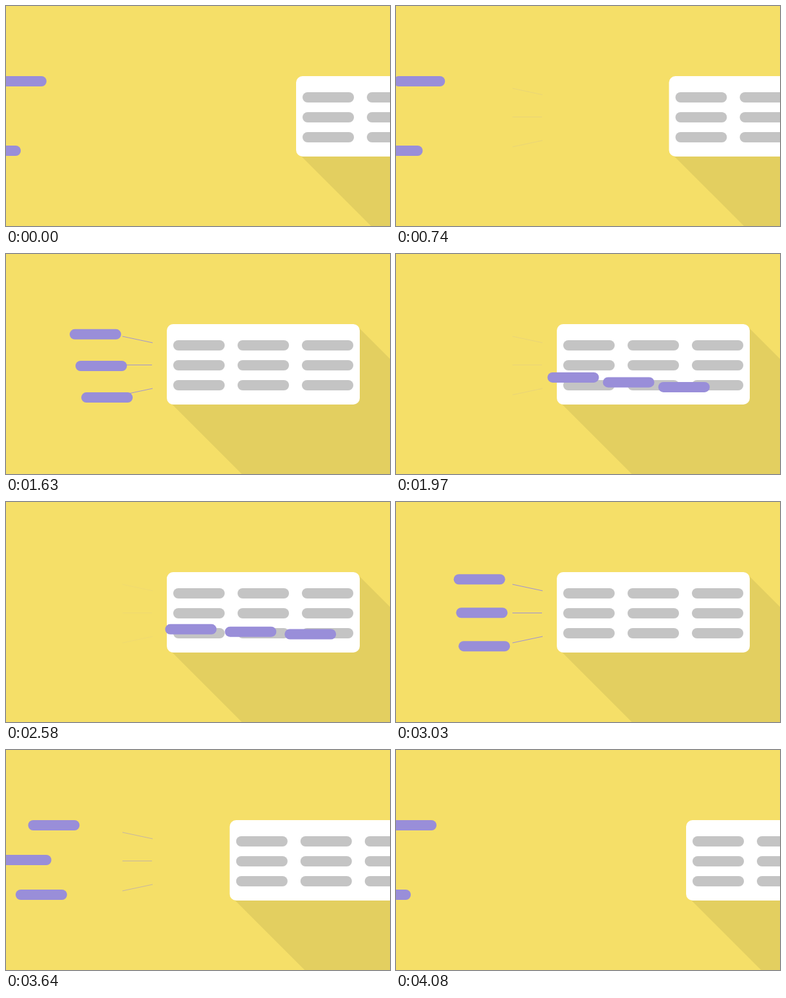
An HTML page for the animation above (4.39 s loop, 597 by 342 pixels).

```html
<!DOCTYPE html>
<html lang="en">
<head>
<meta charset="utf-8">
<title>Pills and card</title>
<style>
  html, body { margin: 0; width: 100%; height: 100%; overflow: hidden; background: #f5df68; }
  svg { display: block; }
  .shadow { fill: #e3cf60; }
  .sheet { fill: #fff; }
  .cell { fill: #c4c4c4; }
  .pill { fill: #998ed9; }
  #rays { stroke: #998ed9; fill: none; opacity: 0; }
</style>
</head>
<body>
<svg width="597" height="342" viewBox="0 0 597 342">
  <defs>
    <rect id="bar" width="80" height="16" rx="8"/>
    <g id="row" class="cell">
      <use href="#bar" x="10"/><use href="#bar" x="110"/><use href="#bar" x="210"/>
    </g>
  </defs>
  <g id="card" transform="translate(451 109)">
    <path class="shadow" d="M0 116.5L400 516.5L700 407L293 0Z"/>
    <rect class="sheet" width="300" height="125" rx="10"/>
    <use href="#row" y="25"/><use href="#row" y="56"/><use href="#row" y="87"/>
  </g>
  <path id="rays" d="M181 128L228 138M181 172.5H227M181 219L228 209"/>
  <use class="pill" href="#bar"/><use class="pill" href="#bar"/><use class="pill" href="#bar"/>
</svg>
<script>
  const LOOP = 4390, STEP = 45, LENGTH = 670, SETTLE = 600;

  // Each move eases one value; lead is how far in its first visible step is.
  const moves = [
    { at: 740, lead: 82, key: 'enter', from: 0, to: 1 },
    { at: 1630, lead: 65, key: 'drop', from: 0, to: 1 },
    { at: 2580, lead: 56, key: 'drop', from: 1, to: 0 },
    { at: 3460, lead: 12, key: 'enter', from: 1, to: 0 }
  ];
  const away = [100, 190, 140];
  const card = document.getElementById('card');
  const rays = document.getElementById('rays');
  const pills = document.querySelectorAll('.pill');

  const mix = (a, b, k) => a + (b - a) * k;
  const bezier = (a, b, s) => 3 * (1 - s) ** 2 * s * a + 3 * (1 - s) * s * s * b + s ** 3;
  const place = (el, x, y) => el.setAttribute('transform', `translate(${x.toFixed(2)} ${y.toFixed(2)})`);

  // cubic-bezier(.25, .1, .25, 1)
  function ease(x) {
    let lo = 0, hi = 1;
    for (let i = 0; i < 20; i++) {
      const mid = (lo + hi) / 2;
      if (bezier(0.25, 0.25, mid) < x) lo = mid; else hi = mid;
    }
    return bezier(0.1, 1, lo);
  }

  function progress(elapsed, lead) {
    if (elapsed >= SETTLE) return 1;
    const tick = Math.floor(elapsed / STEP) * STEP;
    return ease(Math.min(1, (tick + lead) / LENGTH));
  }

  function draw(time) {
    const state = { enter: 0, drop: 0 };
    for (const m of moves) {
      if (time >= m.at) state[m.key] = mix(m.from, m.to, progress(time - m.at, m.lead));
    }
    const { enter, drop } = state;
    place(card, mix(451, 250, enter), 109);
    rays.style.opacity = enter * (1 - drop);
    pills.forEach((pill, i) => {
      const x = 83 - away[i] * (1 - enter);
      place(pill, mix(x, 260 + 100 * i, drop), mix(109 + 54 * i, 196, drop));
    });
  }

  const start = performance.now();
  function frame() {
    draw((performance.now() - start) % LOOP);
    requestAnimationFrame(frame);
  }
  frame();
</script>
</body>
</html>
```
